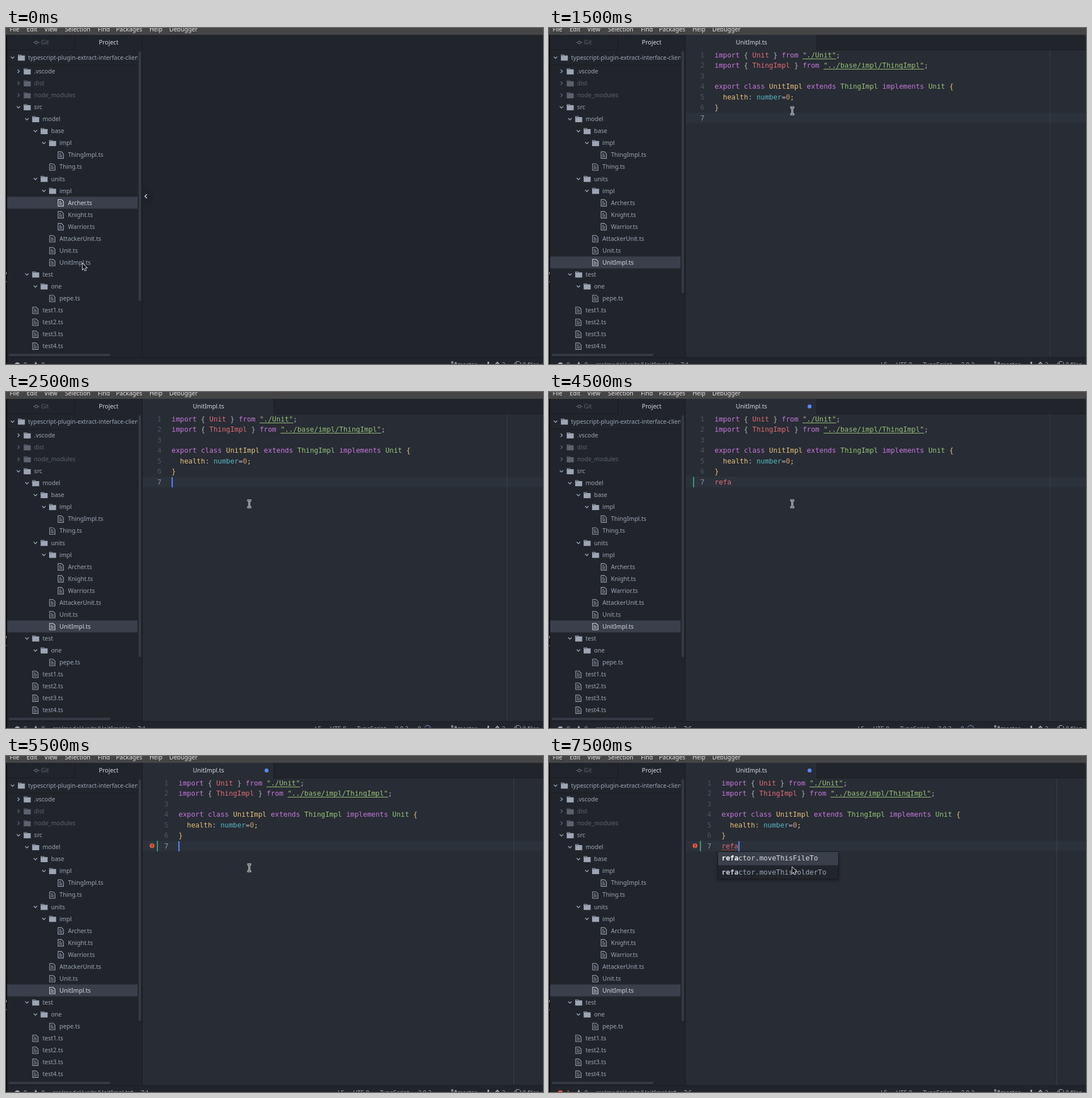
An HTML page with a canvas for the animation above (8000 ms loop, 947 px wide and 592 px high).

```html
<!DOCTYPE html>
<html lang="en">
<head>
<meta charset="utf-8">
<title>Editor session</title>
<style>
html, body { margin: 0; width: 100%; height: 100%; overflow: hidden; background: #21252b; }
canvas { display: block; }
</style>
</head>
<body>
<canvas id="stage" width="947" height="592"></canvas>
<script>
const ctx = document.getElementById('stage').getContext('2d');
const W = 947, LOOP = 8000;
const UI = '"Noto Sans", sans-serif', MONO = '"DejaVu Sans Mono", monospace';
// The window is shown at a reduced scale, so metrics are fractional.
const SCALE = 0.877;
const CHAR = 8.428 * SCALE, LINE = 21 * SCALE, ROW = 24 * SCALE, INDENT = 17 * SCALE;
const UI_SIZE = 12 * SCALE, CODE_SIZE = 14 * SCALE;
const C = {
  panel: '#21252b', editor: '#282c34', border: '#181a1f', select: '#3a3f4b', active: '#2c323c',
  text: '#9da5b4', bright: '#d7dae0', dim: '#5c626e', number: '#4b5364', numberOn: '#8b929f', caret: '#528bff',
  k: '#c678dd', r: '#e06c75', g: '#98c379', c: '#56b6c2', o: '#d19a66', y: '#e5c07b', w: '#abb2bf',
  added: '#35a070', error: '#ec5640'
};

// Each step holds until the next one begins.
const steps = [
  { at: 0, selected: 11, dock: true, mouse: ['arrow', 135, 415] },
  { at: 500, open: true, selected: 16, dock: true, line: 1, caret: true, mouse: ['arrow', 135, 415], server: 'none' },
  { at: 1500, open: true, line: 7, mouse: ['beam', 429, 146], server: 'idle' },
  { at: 2500, open: true, line: 7, caret: true, mouse: ['beam', 429, 197], server: 'busy' },
  { at: 3500, open: true, line: 7, typed: 'refa', dirty: true, mouse: ['beam', 429, 197], server: 'idle' },
  { at: 4500, open: true, line: 7, typed: 'refa', dirty: true, mouse: ['beam', 429, 197], server: 'busy' },
  { at: 5500, open: true, line: 7, caret: true, dirty: true, lint: true, mouse: ['beam', 429, 197], server: 'idle' },
  { at: 6500, open: true, line: 7, dirty: true, lint: true, errors: 1, mouse: ['beam', 429, 197], server: 'busy' },
  { at: 7500, open: true, line: 7, typed: 'refa', caret: true, dirty: true, lint: true, errors: 1, popup: true,
    mouse: ['arrow', 429, 196], server: 'idle' }
];

// Depth, kind (open, closed, file), label.
const tree = [
  [0, 'closed', '.vscode'], [0, 'closed', 'dist'], [0, 'closed', 'node_modules'], [0, 'open', 'src'],
  [1, 'open', 'model'], [2, 'open', 'base'], [3, 'open', 'impl'], [4, 'file', 'ThingImpl.ts'],
  [3, 'file', 'Thing.ts'], [2, 'open', 'units'], [3, 'open', 'impl'], [4, 'file', 'Archer.ts'],
  [4, 'file', 'Knight.ts'], [4, 'file', 'Warrior.ts'], [3, 'file', 'AttackerUnit.ts'], [3, 'file', 'Unit.ts'],
  [3, 'file', 'UnitImpl.ts'], [1, 'open', 'test'], [2, 'open', 'one'], [3, 'file', 'pepe.ts'],
  [1, 'file', 'test1.ts'], [1, 'file', 'test2.ts'], [1, 'file', 'test3.ts'], [1, 'file', 'test4.ts']
];

// Pairs of colour key and text; "u" is an underlined link.
const code = [
  ['k', 'import', 'w', ' { ', 'r', 'Unit', 'w', ' } ', 'k', 'from ', 'u', '"./Unit"', 'w', ';'],
  ['k', 'import', 'w', ' { ', 'r', 'ThingImpl', 'w', ' } ', 'k', 'from ', 'u', '"../base/impl/ThingImpl"', 'w', ';'],
  [],
  ['k', 'export class ', 'y', 'UnitImpl ', 'k', 'extends ', 'g', 'ThingImpl ', 'k', 'implements ', 'g', 'Unit ', 'y', '{'],
  ['y', '  health', 'w', ': ', 'c', 'number', 'w', '=', 'o', '0', 'y', ';'],
  ['y', '}'],
  []
];

function rect(x, y, w, h, color) {
  ctx.fillStyle = color;
  ctx.fillRect(x, y, w, h);
}

function text(str, x, y, color, align = 'left', font = UI_SIZE + 'px ' + UI) {
  ctx.font = font;
  ctx.fillStyle = color;
  ctx.textAlign = align;
  ctx.fillText(str, x, y);
}

function mono(str, x, y, color, weight = '') {
  text(str, x, y, color, 'left', `${weight} ${CODE_SIZE}px ${MONO}`);
}

function path(points, color, width = 1, close = false) {
  ctx.beginPath();
  points.forEach(([x, y]) => ctx.lineTo(x, y));
  if (close) ctx.closePath();
  ctx.strokeStyle = color;
  ctx.lineWidth = width;
  ctx.stroke();
}

function disc(x, y, r, color) {
  ctx.beginPath();
  ctx.arc(x, y, r, 0, 7);
  ctx.fillStyle = color;
  ctx.fill();
}

function ring(x, y, r, color, from = 0, to = 7) {
  ctx.beginPath();
  ctx.arc(x, y, r, from, to);
  ctx.strokeStyle = color;
  ctx.lineWidth = 1.3;
  ctx.stroke();
}

function chevron(x, y, open, color) {
  path(open ? [[x - 3, y - 1.5], [x, y + 1.5], [x + 3, y - 1.5]]
            : [[x - 1.5, y - 3], [x + 1.5, y], [x - 1.5, y + 3]], color, 1.4);
}

function folder(x, y, color) {
  rect(x, y - 5, 6, 3, color);
  rect(x, y - 3.5, 12.3, 9, color);
  rect(x + 1, y - 4, 4, 0.8, C.panel);
}

function page(x, y, color) {
  path([[x + .5, y - 5.5], [x + 6.5, y - 5.5], [x + 10, y - 2], [x + 10, y + 6], [x + .5, y + 6]], color, 1.1, true);
  [-2.5, 0, 2.5].forEach((dy, i) => rect(x + 2.4, y + dy, i ? 5.6 : 3.4, 1, color));
}

function drawMenu() {
  rect(0, 0, W, 12, '#454545');
  const items = { File: 6.5, Edit: 36.5, View: 67.5, Selection: 104, Find: 162, Packages: 194, Help: 253, Debugger: 288 };
  for (const name in items) text(name, items[name], 5.5, '#e6e6e6');
}

function drawTree(s) {
  const selected = s.selected ?? 16;
  rect(0, 12, 241, 569, C.panel);
  rect(2, 38, 119, 1, C.border);
  rect(121, 12, 1, 27, C.border);
  path([[48, 25.5], [51, 25.5]], C.dim, 1.3);
  path([[56, 25.5], [59, 25.5]], C.dim, 1.3);
  ring(53.5, 25.5, 2.3, C.dim);
  text('Git', 61.5, 29, C.dim);
  text('Project', 181, 29, C.bright, 'center');

  ctx.save();
  ctx.beginPath();
  ctx.rect(0, 39, 232, 541);
  ctx.clip();
  chevron(11.5, 52, true, C.text);
  folder(21, 52, C.text);
  text('typescript-plugin-extract-interface-client', 39, 55.5, C.text);
  rect(2, 65, 230, 1, C.border);
  tree.forEach(([depth, kind, label], i) => {
    const y = 76.3 + i * ROW, x = 50 + depth * INDENT;
    const color = i === selected ? C.bright : i === 1 || i === 2 ? C.dim : C.text;
    if (i === selected) rect(2, y - ROW / 2, 230, ROW, C.select);
    if (kind === 'file') page(x - 18.3, y, color);
    else {
      chevron(x - 28, y, kind === 'open', color);
      folder(x - 18.7, y, color);
    }
    text(label, x - .4, y + 3.8, color);
  });
  ctx.restore();

  ctx.fillStyle = '#353a44';
  ctx.beginPath();
  ctx.roundRect(234, 41, 4, s.dock ? 440 : 426, 2);
  ctx.roundRect(5, 574, 179, 4, 2);
  ctx.fill();
  rect(240, 12, 1, 569, C.border);
}

function drawDockButton() {
  ctx.beginPath();
  ctx.arc(240.5, 296.5, 20.5, -Math.PI / 2, Math.PI / 2);
  ctx.fillStyle = '#1f2228';
  ctx.fill();
  path([[248.5, 293], [245, 296.5], [248.5, 300]], C.bright, 1.5);
}

function drawCode(s) {
  const left = s.lint ? 304.3 : 292;
  const top = n => 39 + (n - 1) * LINE;
  rect(241, top(s.line), W - 241, LINE, C.active);
  rect(Math.floor(left + 80 * CHAR), 39, 1, 542, '#3a3f48');

  code.forEach((tokens, i) => {
    const base = top(i + 1) + 13;
    let x = left;
    mono(i + 1, left - 25.2, base, i + 1 === s.line ? C.numberOn : C.number);
    for (let j = 0; j < tokens.length; j += 2) {
      const [key, str] = [tokens[j], tokens[j + 1]];
      mono(str, x, base, C[key] || C.g);
      if (key === 'u') rect(x, Math.round(base + 1.5), str.length * CHAR, 1, C.g);
      x += str.length * CHAR;
    }
  });

  const typed = s.typed || '', y = top(7), end = left + typed.length * CHAR;
  mono(typed, left, y + 13, C.r);
  if (s.dirty) rect(Math.round(left - 38), y, 2, LINE, C.added);
  if (s.lint) {
    disc(257.5, 158.2, 4.1, C.error);
    rect(257, 155.5, 1.2, 3.6, C.editor);
    rect(257, 160, 1.2, 1.2, C.editor);
    for (let x = left; x < end; x += 4) if (typed) rect(x, 165, 2.5, 1, C.error);
  }
  if (s.caret) rect(Math.round(end), Math.round(top(s.line)), 2, 18, C.caret);
}

function drawEditor(s) {
  rect(241, 12, W - 241, 569, C.panel);
  if (!s.open) return;
  rect(241, 38, W - 241, 1, C.border);
  rect(241, 12, 231, 27, C.editor);
  rect(472, 12, 1, 27, C.border);
  rect(241, 39, W - 241, 542, C.editor);
  text('UnitImpl.ts', 357, 29, C.bright, 'center');
  if (s.dirty) disc(459.5, 25.5, 3.5, '#568af2');
  drawCode(s);
}

function drawPopup() {
  ctx.save();
  ctx.shadowColor = 'rgba(0,0,0,.4)';
  ctx.shadowBlur = 5;
  ctx.shadowOffsetY = 2;
  rect(297, 168, 214, 49, C.border);
  ctx.restore();
  rect(298, 169, 212, 47, C.panel);
  rect(298, 169, 212, 23.5, C.select);
  ['ctor.moveThisFileTo', 'ctor.moveThisFolderTo'].forEach((rest, i) => {
    const x = 304.5, y = 184.2 + i * 24.5;
    mono('refa', x, y, i ? '#c9ced8' : '#ffffff', 'bold');
    mono(rest, x + 4 * CHAR, y, i ? C.text : C.bright);
  });
}

function drawStatus(s) {
  const put = (str, x, color = C.text) => text(str, x, 597.2, color);
  rect(0, 580, W, 12, C.panel);
  rect(0, 580, W, 1, C.border);
  const alert = s.errors ? C.error : C.text;
  disc(20, 593.5, 4.6, alert);
  put(s.errors || 0, 31, alert);
  path([[48, 598], [52.5, 589.5], [57, 598]], C.text, 1.8, true);
  put(0, 62.5);
  if (s.open) {
    const column = 1 + (s.typed || '').length;
    put('src/model/units/UnitImpl.ts' + (s.dirty ? '*' : ''), 82.5);
    put(s.line + ':' + column, s.dirty ? 237.5 : 232);
    const x = { none: 623, idle: 585, busy: 544.5 }[s.server];
    put('LF', x);
    put('UTF-8', x + 27);
    put('TypeScript', x + 74.5);
    if (s.server !== 'none') put('2.0.2', x + 141.5);
    if (s.server === 'busy') {
      put(0, 726);
      ring(743.5, 593, 5.5, '#7179a8', 3.5, 6.1);
    }
  }
  ring(787, 589, 1.4, C.text);
  ring(793, 590.5, 1.4, C.text);
  path([[787, 590], [787, 597]], C.text);
  put('master', 796);
  rect(849, 588, 3, 5, C.text);
  path([[863, 593], [866.5, 589], [870, 593]], C.text, 2);
  put(2, 874.5);
  path([[897, 597], [897, 590], [900, 590]], C.text);
  path([[900, 597], [900, 587.5], [905, 587.5], [907.5, 590], [907.5, 597]], C.text);
  put('0 files', 911);
}

function drawMouse([kind, x, y]) {
  if (kind === 'beam') {
    [['#ffffff', 3], ['#15171b', 1]].forEach(([color, width]) => {
      path([[x, y - 6], [x, y + 6]], color, width);
      path([[x - 3.5, y - 6], [x + 3.5, y - 6]], color, width);
      path([[x - 3.5, y + 6], [x + 3.5, y + 6]], color, width);
    });
    return;
  }
  const shape = [[0, 0], [0, 10.5], [2.5, 8.3], [4.2, 12.3], [6, 11.5], [4.3, 7.6], [7.6, 7.5]];
  path(shape.map(([dx, dy]) => [x + dx, y + dy]), '#ffffff', 1.5, true);
  ctx.fillStyle = '#111317';
  ctx.fill();
}

function draw(time) {
  const t = time % LOOP;
  const s = steps.findLast(step => step.at <= t);
  drawTree(s);
  drawEditor(s);
  if (s.dock) drawDockButton();
  drawStatus(s);
  drawMenu();
  rect(0, 12, 2, 580, '#0b0c0f');
  rect(0, 430, 1, 4, '#b8b8b8');
  rect(0, 446, 1, 2, '#8a8a8a');
  if (s.popup) drawPopup();
  drawMouse(s.mouse);
}

const start = performance.now();
function tick() {
  draw(performance.now() - start);
  requestAnimationFrame(tick);
}
tick();
</script>
</body>
</html>
```
